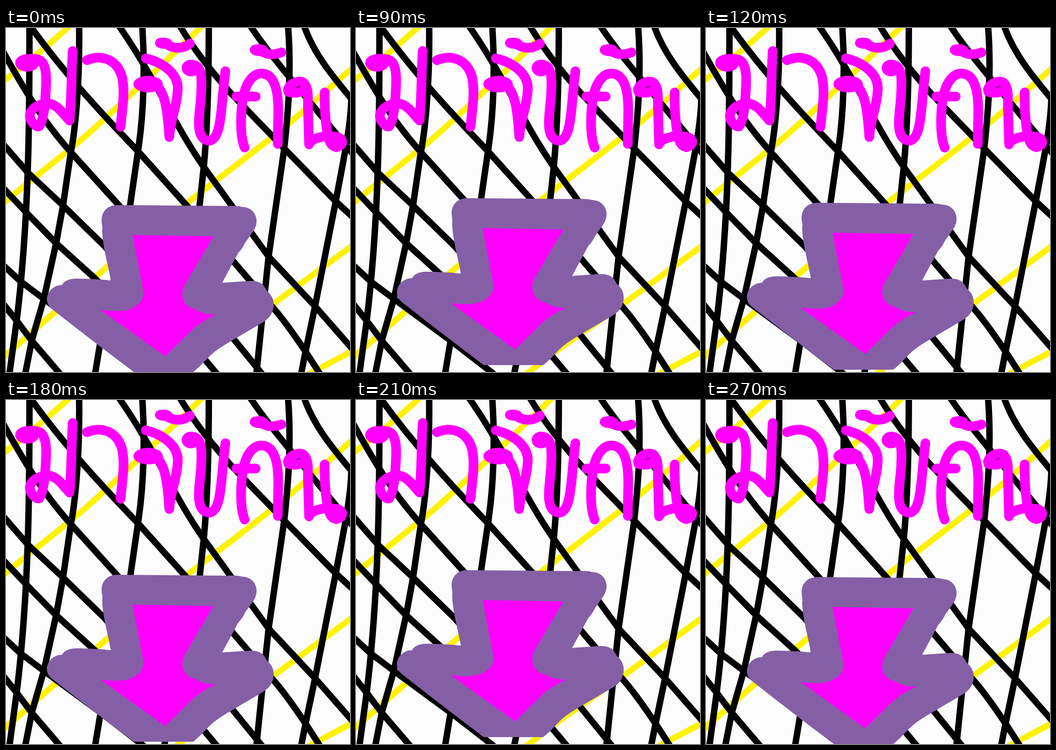
Recreate the animation shown at these times as an HTML page. Size 748 by 748 pixels, loop 0.3 s.

```html
<!DOCTYPE html>
<html lang="th">
<head>
<meta charset="utf-8">
<title>มาจับกัน</title>
<style>
  html, body { margin: 0; width: 100%; height: 100%; overflow: hidden; background: #fcfcfc; }
  svg { display: block; width: 100%; height: 100%; }
  .lines, .letters { fill: none; stroke-linecap: round; stroke-linejoin: round; }
  .yellow { stroke: #fff200; stroke-width: 13; }
  .black { stroke: #000; stroke-width: 14; }
  .letters { stroke: #f0f; stroke-width: 21; }
  .letters ellipse { fill: #f0f; stroke: none; }
  .arrow { animation: bounce 300ms step-end infinite; }
  @keyframes bounce {
    0%, 50%, 90%, 100% { transform: translateY(0); }
    20%, 40%, 60%, 80% { transform: translateY(-5px); }
    30%, 70% { transform: translateY(-15px); }
  }
</style>
</head>
<body>
<svg viewBox="0 0 748 748">
  <g class="lines yellow">
    <path d="M-8 117Q65 62 140-6"/>
    <path d="M-8 383C60 325 110 288 160 246S300 118 428-6"/>
    <path d="M-8 718L100 623L220 519L392 382C450 336 520 284 580 236S690 143 756 84"/>
    <path d="M368 754L440 699L585 597L756 471"/>
    <path d="M655 754L756 701"/>
  </g>

  <g class="lines black">
    <!-- uprights -->
    <path d="M51-8C51 110 50 240 47 315C44 420 35 540 24 630L7 756"/>
    <path d="M159-8C161 130 149 230 141 270L124 386L109 468L82 590L56 680L41 756"/>
    <path d="M296-8C303 90 299 190 287 268L270 385L204 690L193 756"/>
    <path d="M441-8C441 120 437 230 430 302L421 386L343 756"/>
    <path d="M613-8C621 90 614 180 605 262L571 497L556 640L544 756"/>
    <path d="M751 150C750 215 733 290 717 377L672 605L650 710L641 756"/>
    <!-- diagonals -->
    <path d="M-6 52C40 135 80 202 141 270L245 385L490 670L560 756"/>
    <path d="M50-8C120 90 200 178 287 268L392 385L500 514L590 619Q630 668 685 756"/>
    <path d="M243-8C320 100 365 210 430 302L492 388L571 497L672 605L756 701"/>
    <path d="M376-8C410 50 450 98 490 143L605 262L717 377L756 413"/>
    <path d="M529-8C570 55 640 135 756 276"/>
    <path d="M647-8C668 55 710 105 756 160"/>
    <path d="M-6 253L48 315L124 386L215 475L430 718L462 756"/>
    <path d="M-6 348L43 400L109 468L195 546L300 650"/>
    <path d="M-6 516L33 552L85 591L205 679L298 751"/>
    <path d="M-6 600L22 635L56 680L121 756"/>
  </g>

  <g class="letters" role="img" aria-label="มาจับกัน">
    <ellipse cx="46" cy="76" rx="26" ry="19"/>
    <path d="M32 73C42 65 66 65 75 71C90 82 88 115 86 145C84 180 80 203 72 214C62 216 46 195 54 183C62 168 82 163 97 165C113 169 124 186 138 201C143 155 142 95 145 50"/>
    <path d="M176 70C207 57 240 67 252 105C260 140 252 180 249 215"/>
    <ellipse cx="309" cy="122" rx="32" ry="18"/>
    <path d="M304 66C341 75 379 100 373 140C370 178 358 195 355 237C352 190 348 130 318 119"/>
    <ellipse cx="343" cy="33" rx="19" ry="12"/>
    <path d="M335 32C350 31 353 43 375 43Q388 43 400 34"/>
    <ellipse cx="402" cy="87" rx="20" ry="18"/>
    <path d="M405 80C430 82 425 120 424 150C420 195 410 243 443 245C470 240 467 170 477 94"/>
    <path d="M501 149H543"/>
    <path d="M519 260C508 235 510 180 516 150C522 115 540 98 556 99C587 100 592 145 592 180L591 252"/>
    <ellipse cx="550" cy="48" rx="20" ry="13"/>
    <path d="M541 47C556 47 560 57 576 57Q590 57 599 53"/>
    <path d="M613 134C618 118 640 113 647 119C661 132 655 160 657 185L659 253C661 241 690 233 712 236Q728 237 731 246Q732 256 718 259"/>
    <path d="M614 139Q628 143 642 138"/>
    <path d="M693 140C692 180 696 230 705 249Q709 257 718 259"/>
  </g>

  <g class="arrow">
    <path fill="#855fa6" d="M242 385C220 385 207 400 208 420C208 428 211 432 209 440C210 475 221 510 228 549C200 546 175 545 152 545C138 545 126 550 122 559C102 559 88 575 89 592C90 605 100 611 110 619Q190 682 278 748H407C430 730 439 714 459 700S515 666 560 639C575 630 583 615 582 600C582 585 573 577 566 570C560 555 548 549 530 550L470 554L505 489C512 482 516 475 520 467L537 443C545 432 546 420 544 413C540 395 525 389 512 389C505 386 490 387 480 387Z"/>
    <path fill="#f0f" d="M275 450L451 453L388 560C379 577 383 600 403 609C415 611 425 624 457 623C430 635 410 650 395 666L346 714L205 613C235 617 262 617 278 607C297 595 301 585 297 565Z"/>
  </g>
</svg>
</body>
</html>
```
